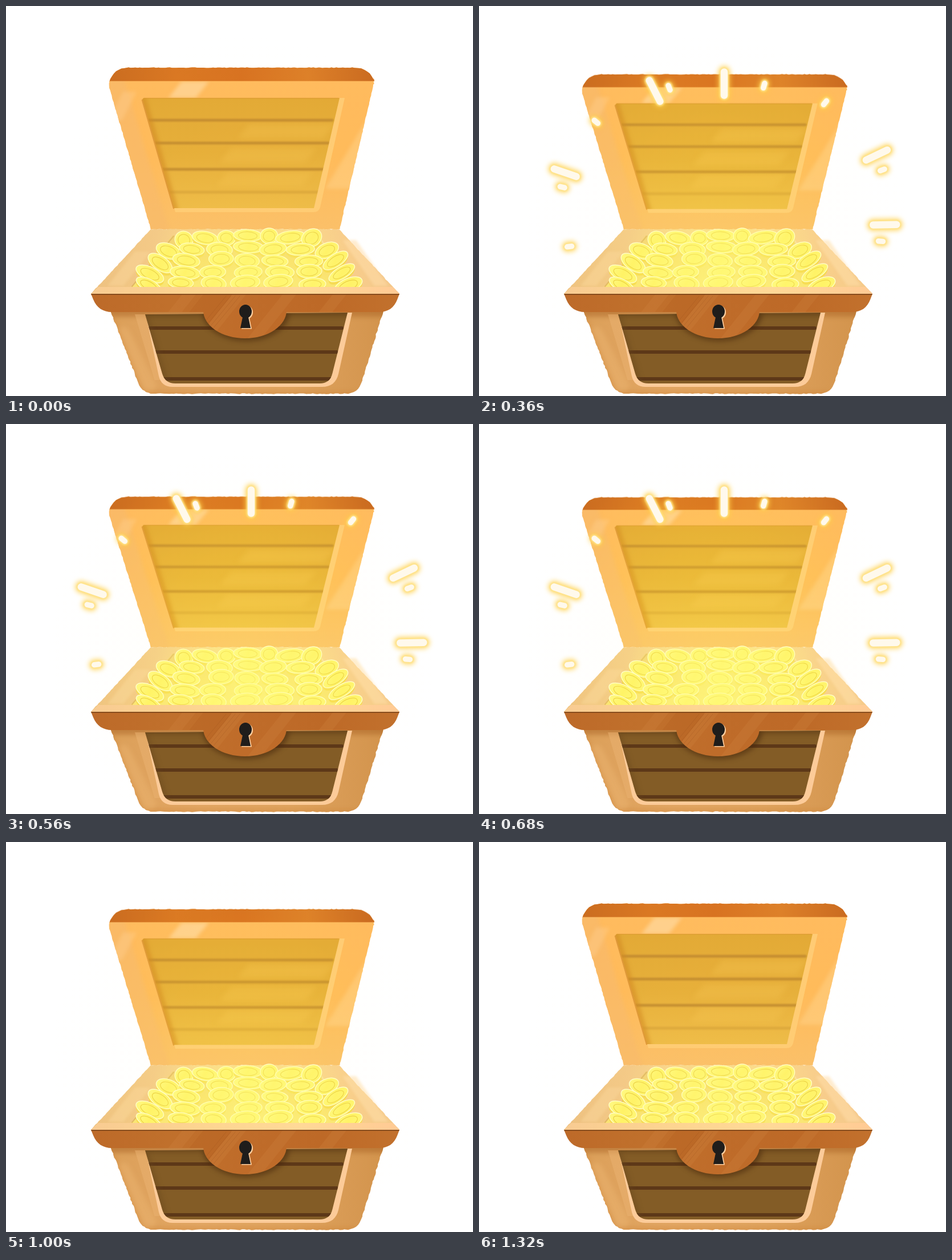
Recreate the animation shown at these times as an HTML page with a canvas. Size 819x683 px, loop 1.36 s.

```html
<!DOCTYPE html>
<html lang="en">
<head>
<meta charset="utf-8">
<title>Treasure chest</title>
<style>
  html, body { margin: 0; width: 100%; height: 100%; overflow: hidden; background: #fff; }
  canvas { display: block; }
</style>
</head>
<body>
<canvas id="stage" width="819" height="683"></canvas>
<script>
const W = 819, H = 683, LOOP = 1360, STEP = 40, SWING = 1320;
const HINGE = 391, LID_TOP = 108, LID_DROP = 20.5;
const SPARKS_ON = 300, SPARKS_OFF = 900;
const stage = document.getElementById('stage').getContext('2d');

let seed = 11;
const random = () => (seed = (seed * 16807) % 2147483647) / 2147483647;
const jitter = amount => (random() - 0.5) * amount;
const mix = (a, b, k) => a + (b - a) * k;

function layer(paint) {
  const canvas = document.createElement('canvas');
  canvas.width = W;
  canvas.height = H;
  const c = canvas.getContext('2d');
  c.lineCap = c.lineJoin = 'round';
  paint(c);
  return canvas;
}

function ramp(c, x0, y0, x1, y1, ...colors) {
  const g = c.createLinearGradient(x0, y0, x1, y1);
  colors.forEach((color, i) => g.addColorStop(i / (colors.length - 1), color));
  return g;
}

// Polygon of [x, y, corner radius], optionally frayed like a dry brush edge.
function shape(corners, fray = 0) {
  const path = new Path2D();
  const add = (x, y) => path.lineTo(x + jitter(fray), y + jitter(fray));
  const toward = ([x, y], [tx, ty], d) => {
    const k = d / Math.hypot(tx - x, ty - y);
    return [mix(x, tx, k), mix(y, ty, k)];
  };
  corners.forEach((corner, i) => {
    const n = corners.length, r = corner[2] || 0;
    const before = corners[(i + n - 1) % n], after = corners[(i + 1) % n];
    const from = toward(corner, before, r), to = toward(corner, after, r);
    for (let k = 0; k <= 1; k += r ? 0.125 : 1) {
      add(mix(mix(from[0], corner[0], k), mix(corner[0], to[0], k), k),
        mix(mix(from[1], corner[1], k), mix(corner[1], to[1], k), k));
    }
    const end = toward(after, corner, after[2] || 0);
    const length = Math.hypot(end[0] - to[0], end[1] - to[1]);
    for (let d = 4; fray && d < length; d += 4) {
      add(mix(to[0], end[0], d / length), mix(to[1], end[1], d / length));
    }
  });
  path.closePath();
  return path;
}

function fill(c, path, color) {
  c.fillStyle = color;
  c.fill(path);
}

function line(c, x0, y0, x1, y1, color, width) {
  c.strokeStyle = color;
  c.lineWidth = width;
  c.beginPath();
  c.moveTo(x0, y0);
  c.lineTo(x1, y1);
  c.stroke();
}

function soft(c, blur, paint) {
  c.save();
  c.filter = `blur(${blur}px)`;
  paint();
  c.restore();
}

function clipped(c, path, paint) {
  c.save();
  c.clip(path);
  paint();
  c.restore();
}

// Slanted streak of brushwork.
function glint(c, x, y, width, height, color, lean = 0.8) {
  const dx = height * lean;
  fill(c, shape([[x, y], [x + width, y], [x + width - dx, y + height], [x - dx, y + height]]), color);
}

const lid = layer(c => {
  const outline = shape([[188, LID_TOP, 27], [638, LID_TOP, 27], [646, 132, 6],
    [585, HINGE], [254, HINGE], [180, 139, 6]], 1);
  clipped(c, outline, () => {
    c.fillStyle = ramp(c, 0, 130, 0, HINGE, '#ffbb5e', '#ffba5a', '#fbbf69');
    c.fillRect(0, 0, W, HINGE);
    soft(c, 3, () => {
      line(c, 192, 135, 268, 391, 'rgba(248,186,108,.7)', 34);
      glint(c, 308, 132, 48, 29, '#ffd08c');
      glint(c, 650, 170, 50, 150, 'rgba(255,210,138,.5)', 0.6);
      glint(c, 205, 150, 24, 50, 'rgba(255,207,145,.4)', 0.5);
    });
    c.fillStyle = ramp(c, 183, 0, 645, 0, '#cb6d20', '#da7823', '#d87221', '#dd8029', '#ca6b20');
    c.fillRect(175, LID_TOP - 3, 480, 26.5);
  });

  fill(c, shape([[240, 161, 5], [594, 161], [549, 361, 10], [297, 361]]), '#ffcb74');
  clipped(c, shape([[238, 161, 6], [585, 161], [540, 354], [294, 354]]), () => {
    c.fillStyle = ramp(c, 0, 161, 0, 354, '#e3a936', '#e6ae3a', '#eebb48');
    c.fillRect(230, 155, 365, 205);
    soft(c, 5, () => {
      for (let y = 207; y < 330; y += 42) glint(c, 350 + random() * 80, y, 150, 25, 'rgba(246,196,81,.35)');
    });
    soft(c, 0.8, () => [200, 240, 286, 326].forEach((y, i) => {
      line(c, 250 + 11 * i, y, 572 - 7 * i, y, `rgba(189,135,48,${i < 3 ? 0.8 : 0.3})`, 5);
    }));
    soft(c, 3, () => line(c, 240, 164, 296, 358, 'rgba(211,139,38,.6)', 13));
  });
  line(c, 239, 165, 294, 354, '#df9838', 2.5);
  line(c, 242, 161.5, 583, 161.5, 'rgba(219,151,49,.6)', 1.5);
});

function coin(c, x, y, rx, ry, tilt) {
  const oval = (dy, scale) => {
    c.beginPath();
    c.ellipse(x, y + dy, rx * scale, ry * scale, tilt * Math.PI / 180, 0, 7);
  };
  c.fillStyle = '#f6d850';
  for (let dy = 5; dy > 0; dy--) { oval(dy, 1); c.fill(); }
  c.fillStyle = ramp(c, x - rx, y - ry, x + rx, y + ry, '#fff985', '#fff266', '#fff677');
  oval(0, 1);
  c.fill();
  c.lineWidth = 1.5;
  c.strokeStyle = '#fffdc4';
  c.stroke();
  c.lineWidth = 1.2;
  c.strokeStyle = '#ebd044';
  oval(0.5, 0.66);
  c.stroke();
}

// Rows from back to front, spreading as the basin widens; outer coins lean in.
function coinPile(c) {
  const rows = 5, perRow = 7;
  for (let row = 0; row < rows; row++) {
    const u = row / (rows - 1);
    const spread = 112 + 60 * u * (2 - u);
    for (let i = 0; i < perRow; i++) {
      const v = 2 * i / (perRow - 1) - 1;
      const upright = row === 0 && i % 2 === 0;
      const rx = (upright ? 16 : 24) + jitter(5);
      const ry = (upright ? 14 : 11.5) + jitter(3);
      const x = 424 + spread * v + (row ? jitter(12) : 0);
      coin(c, x, 404 + 20 * row + 4 * v * v + jitter(5), rx, ry, -28 * v ** 3 + jitter(14));
    }
  }
}

const hoard = layer(c => {
  fill(c, shape([[254, 391], [584, 391], [690, 504], [149, 504]], 1),
    ramp(c, 149, 0, 690, 0, '#edc080', '#f8ce8c', '#fbd18d', '#f4c78a'));
  soft(c, 2, () => {
    glint(c, 226, 430, 28, 60, 'rgba(247,210,150,.65)');
    glint(c, 590, 410, 24, 80, 'rgba(255,220,170,.55)', -0.7);
  });
  const basin = shape([[292, 402], [545, 402], [615, 492], [219, 492]]);
  fill(c, basin, ramp(c, 0, 400, 0, 492, '#f2ce79', '#f8da68', '#fae474'));
  line(c, 294, 403, 221, 491, '#e0b466', 2);
  line(c, 547, 403, 616, 491, '#fadb9c', 3);
  coinPile(c);
});

const front = layer(c => {
  const body = shape([[183, 533], [662, 533], [618, 679, 24], [239, 679, 20]], 1.6);
  clipped(c, body, () => {
    c.fillStyle = ramp(c, 185, 0, 660, 0, '#dca05a', '#e2a663', '#dfa35e', '#d3944d');
    c.fillRect(180, 525, 490, 160);
    soft(c, 4, () => {
      line(c, 180, 536, 665, 536, 'rgba(166,96,35,.5)', 16);
      line(c, 205, 575, 250, 665, 'rgba(236,179,112,.5)', 26);
      line(c, 183, 540, 238, 679, 'rgba(205,130,54,.6)', 6);
      line(c, 245, 679, 615, 679, 'rgba(205,130,54,.6)', 6);
    });
    glint(c, 226, 540, 19, 115, 'rgba(236,179,115,.5)', -0.3);
  });

  fill(c, shape([[245, 540], [607, 537], [578, 667, 24], [272, 667, 20]]), '#fccb99');
  clipped(c, shape([[244, 540], [599, 537], [568, 661, 18], [279, 661, 18]]), () => {
    c.fillStyle = '#835c26';
    c.fillRect(235, 530, 380, 140);
    soft(c, 0.7, () => [564, 606, 653].forEach((y, i) => {
      line(c, 253 + 11 * i, y, 589 - 9 * i, y, '#5d3818', 6);
    }));
    soft(c, 4, () => {
      line(c, 240, 537, 610, 537, 'rgba(70,39,12,.5)', 9);
      line(c, 245, 544, 280, 660, 'rgba(105,71,28,.5)', 8);
      c.beginPath();
      c.ellipse(421, 537, 76, 50, 0, 0, Math.PI);
      fill(c, new Path2D(), '');
      c.fillStyle = 'rgba(70,39,12,.55)';
      c.fill();
    });
  });

  const band = shape([[149, 504], [690, 504], [678, 536, 24], [162, 536, 24]]);
  band.moveTo(492, 533);
  band.ellipse(419, 533, 73, 49, 0, 0, Math.PI);
  clipped(c, band, () => {
    c.fillStyle = ramp(c, 150, 0, 690, 0, '#bd6a29', '#c0702c', '#bf6c2a', '#bd6927', '#c2712d');
    c.fillRect(145, 500, 550, 90);
    glint(c, 347, 504, 50, 80, 'rgba(177,94,29,.28)');
    for (let x = 310; x < 600; x += 88) glint(c, x, 504, 24, 80, 'rgba(206,130,62,.28)');
    for (let x = 386; x < 415; x += 8) line(c, x, 508, x - 48, 566, 'rgba(148,77,29,.25)', 1);
  });
  fill(c, shape([[162, 492], [678, 492], [690, 504], [149, 504]]),
    ramp(c, 150, 0, 690, 0, '#f8cb92', '#fdd490', '#ffd997', '#ffca94'));
  line(c, 150, 505, 689, 505, '#75431a', 1.6);

  const keyhole = shape([[416, 540], [424, 540], [429, 564], [411, 564]]);
  keyhole.moveTo(431, 535);
  keyhole.ellipse(420, 535, 11, 12, 0, 0, 7);
  c.save();
  c.translate(2, 1.5);
  fill(c, keyhole, '#ffd0a0');
  c.restore();
  fill(c, keyhole, '#1f1d1b');
});

// Rays around the hoard, given by their angle in degrees from straight up.
const LONG_RAYS = [-71, -27, 0, 64.6, 89];
const SHORT_RAYS = [-97, -76, -50.5, -21.5, 15.7, 39, 70, 95];

function ray(c, degrees, length, width) {
  const angle = degrees * Math.PI / 180;
  const radius = 252 + 44 * Math.sin(1.4 * angle) ** 2;
  const stroke = (blur, color, size) => soft(c, blur, () =>
    line(c, 0, -radius - length / 2, 0, -radius + length / 2, color, size));
  c.save();
  c.translate(430, 388);
  c.rotate(angle);
  stroke(4, 'rgba(255,207,72,.75)', width + 9);
  stroke(1.5, '#ffe389', width + 4);
  stroke(0.6, '#fff9ec', width);
  c.restore();
}

const sparks = layer(c => {
  LONG_RAYS.forEach(angle => ray(c, angle, 41, 12.5));
  SHORT_RAYS.forEach(angle => ray(c, angle, 8, 9.5));
});

function glow(x, y, radius, rgb, alpha, mode) {
  const g = stage.createRadialGradient(x, y, 0, x, y, radius);
  g.addColorStop(0, `rgba(${rgb},${alpha})`);
  g.addColorStop(0.5, `rgba(${rgb},${alpha * 0.6})`);
  g.addColorStop(1, `rgba(${rgb},0)`);
  stage.globalCompositeOperation = mode;
  stage.fillStyle = g;
  stage.fillRect(0, 0, W, H);
  stage.globalCompositeOperation = 'source-over';
}

const rim = shape([[254, HINGE], [584, HINGE], [690, 504], [149, 504]]);

function draw(now) {
  const t = Math.floor((now % LOOP) / STEP) * STEP;
  const swing = (1 - Math.cos(2 * Math.PI * t / SWING)) / 2;
  const squash = 1 - LID_DROP * swing / (HINGE - LID_TOP);

  stage.fillStyle = '#fff';
  stage.fillRect(0, 0, W, H);
  stage.save();
  stage.translate(0, HINGE);
  stage.scale(1, squash);
  stage.drawImage(lid, 0, -HINGE);
  stage.restore();
  stage.drawImage(hoard, 0, 0);

  glow(418, 405, 340, '255,218,130', 0.04 + 0.3 * swing, 'overlay');
  clipped(stage, rim, () =>
    glow(425, 462, 175, '255,252,130', 0.38 + 0.22 * swing, 'source-over'));
  glow(415, 390, 345, '255,251,235', 0.08 + 0.14 * swing, 'multiply');

  stage.drawImage(front, 0, 0);
  if (t > SPARKS_ON && t < SPARKS_OFF) stage.drawImage(sparks, 0, 0);
}

let start;
function loop(now) {
  start ??= now;
  draw(now - start);
  requestAnimationFrame(loop);
}
requestAnimationFrame(loop);
</script>
</body>
</html>
```
